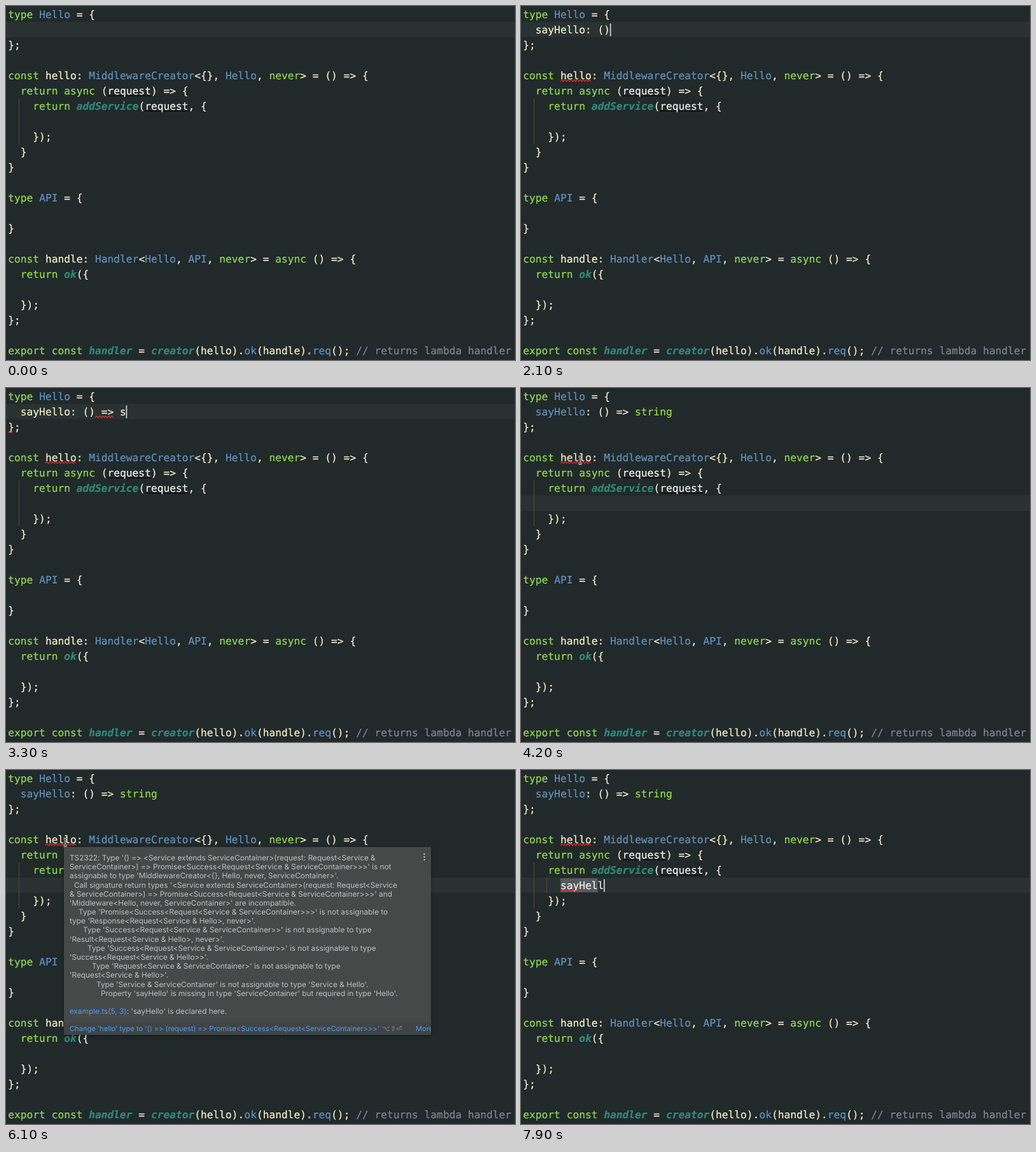
Recreate the animation shown at these times as an HTML page. Size 800 by 556 pixels, loop 8000 ms.

```html
<!DOCTYPE html>
<html lang="en">
<head>
<meta charset="utf-8">
<title>Typed middleware</title>
<style>
html, body { margin: 0; width: 100%; height: 100%; overflow: hidden; background: #22292b; }
svg { display: block; width: 800px; height: 556px; }
text { white-space: pre; text-rendering: geometricPrecision; font-variant-ligatures: none; font-feature-settings: "calt" 0; }
#code text { font: 16.23px "DejaVu Sans Mono", monospace; color: #f5f1c6; }
#code tspan { fill: currentColor; stroke: currentColor; stroke-width: .22px; }
#code .kw { color: #8fdb52; }
#code .type { color: #6093bf; }
#code .fn { color: #2f8a77; font-weight: bold; font-style: italic; }
#code .plain { color: #f3f3ec; }
#code .note { color: #7c878c; }
.under { stroke: #0b0e0f; stroke-width: 1.4; }
.wave { fill: none; stroke: #d2312d; stroke-width: 1.3; }
.guide { stroke: #6a4030; stroke-width: 1; }
#tip text { font-family: Inter, sans-serif; font-size: 11.8px; fill: #bdbfc0; }
#tip .link { fill: #4b9bf0; }
#tip .action { font-size: 11.1px; }
#tip .keys { font-family: "DejaVu Sans", sans-serif; font-size: 11px; fill: #8d9092; }
#panel { filter: drop-shadow(0 2px 3px rgba(0, 0, 0, .35)); }
#mouse path { fill: none; stroke: #fff; stroke-width: 2.4; }
#mouse path + path { stroke: #111; stroke-width: 1; }
</style>
</head>
<body>
<svg viewBox="0 0 800 556">
  <defs><clipPath id="edge"><rect x="91" y="121" width="577" height="295"/></clipPath></defs>
  <rect width="800" height="556" fill="#22292b"/>
  <rect id="band" width="800" height="24" fill="#293133"/>
  <rect id="box" height="22" fill="#555b5c"/>
  <path class="guide" d="M20.5 145V217"/>
  <path class="guide" id="inner" d="M40.5 169V193"/>
  <path class="under" d="M160 141.3H228M218 165.3H286"/>
  <g id="code"></g>
  <g id="waves"></g>
  <rect id="caret" width="1.6" height="20" fill="#dcdedc"/>
  <g id="tip">
    <rect id="panel" x="91" y="121" width="577" height="295" fill="#474949"/>
    <rect x="91" y="396" width="577" height="20" fill="#404446"/>
    <g fill="#b4b6b7">
      <circle cx="657.5" cy="132" r="1.3"/><circle cx="657.5" cy="136.5" r="1.3"/><circle cx="657.5" cy="141" r="1.3"/>
    </g>
    <g id="tipText" clip-path="url(#edge)"></g>
  </g>
  <g id="mouse"></g>
</svg>
<script>
const LOOP = 8000, CHAR = 9.772, LEFT = 3.3, ROW = 24;
const $ = id => document.getElementById(id);
const colX = col => LEFT + col * CHAR;
const baseY = row => 19 + (row - 1) * ROW;

function add(parent, tag, attrs, text) {
  const el = document.createElementNS('http://www.w3.org/2000/svg', tag);
  for (const key in attrs) el.setAttribute(key, attrs[key]);
  if (text !== undefined) el.textContent = text;
  parent.appendChild(el);
  return el;
}

// One capture group per token class, in the order of CLASSES.
const CLASSES = ['note', 'kw', 'type', 'fn', 'plain'];
const TOKENS = /(\/\/.*)|\b(type|const|return|async|export|never|string)\b|(\b(?:Hello|MiddlewareCreator|Handler|API)\b|(?<=\.)(?:ok|req)\b)|\b(addService|creator|handler|ok)\b|\b(request)\b/g;

function highlight(el, src) {
  let last = 0;
  for (const m of src.matchAll(TOKENS)) {
    add(el, 'tspan', {}, src.slice(last, m.index));
    add(el, 'tspan', { class: CLASSES[m.slice(1).findIndex(Boolean)] }, m[0]);
    last = m.index + m[0].length;
  }
  add(el, 'tspan', {}, src.slice(last));
}

const source = `type Hello = {

};

const hello: MiddlewareCreator<{}, Hello, never> = () => {
  return async (request) => {
    return addService(request, {

    });
  }
}

type API = {

}

const handle: Handler<Hello, API, never> = async () => {
  return ok({

  });
};

export const handler = creator(hello).ok(handle).req(); // returns lambda handler`;

const rows = source.split('\n').map((src, i) => {
  const el = add($('code'), 'text', { x: LEFT, y: baseY(i + 1) });
  highlight(el, src);
  return el;
});

// Each entry: indent level, text.
const message = [
  [0, "TS2322: Type '() => <Service extends ServiceContainer>(request: Request<Service &"],
  [0, "ServiceContainer>) => Promise<Success<Request<Service & ServiceContainer>>>' is not"],
  [0, "assignable to type 'MiddlewareCreator<{}, Hello, never, ServiceContainer>'."],
  [1, "Call signature return types '<Service extends ServiceContainer>(request: Request<Service"],
  [0, "& ServiceContainer>) => Promise<Success<Request<Service & ServiceContainer>>>' and"],
  [0, "'Middleware<Hello, never, ServiceContainer>' are incompatible."],
  [2, "Type 'Promise<Success<Request<Service & ServiceContainer>>>' is not assignable to"],
  [0, "type 'Response<Request<Service & Hello>, never>'."],
  [3, "Type 'Success<Request<Service & ServiceContainer>>' is not assignable to type"],
  [0, "'Result<Request<Service & Hello>, never>'."],
  [4, "Type 'Success<Request<Service & ServiceContainer>>' is not assignable to type"],
  [0, "'Success<Request<Service & Hello>>'."],
  [5, "Type 'Request<Service & ServiceContainer>' is not assignable to type"],
  [0, "'Request<Service & Hello>'."],
  [6, "Type 'Service & ServiceContainer' is not assignable to type 'Service & Hello'."],
  [7, "Property 'sayHello' is missing in type 'ServiceContainer' but required in type 'Hello'."]
];
const tipText = $('tipText');
message.forEach(([depth, s], i) => add(tipText, 'text', { x: 100 + depth * 7, y: 142 + i * 14.18 }, s));
const where = add(tipText, 'text', { x: 100, y: 383 });
add(where, 'tspan', { class: 'link' }, 'example.ts(5, 3)');
add(where, 'tspan', {}, ": 'sayHello' is declared here.");
add(tipText, 'text', { x: 100, y: 410, class: 'link action' },
  "Change 'hello' type to '() => (request) => Promise<Success<Request<ServiceContainer>>>'");
add(tipText, 'text', { x: 591, y: 410, class: 'keys' }, '⌥⇧⏎');
add(tipText, 'text', { x: 644, y: 410, class: 'link action' }, 'More actions...');

// Text cursor: a pale outline under a dark core.
for (let i = 0; i < 2; i++) {
  add($('mouse'), 'path', { d: 'M90.5 107.5Q93 107.5 93 109.5V117.5Q93 119.5 90.5 119.5M95.5 107.5Q93 107.5 93 109.5M93 117.5Q93 119.5 95.5 119.5' });
}

function wave(row, from, to) {
  const end = colX(to);
  let x = colX(from), d = `M${x} ${baseY(row) + 3.6}`;
  for (let up = true; x + 2.4 <= end; up = !up) {
    x += 2.4;
    d += `L${x} ${baseY(row) + (up ? 0.8 : 3.6)}`;
  }
  return add($('waves'), 'path', { class: 'wave', d });
}

const show = (el, on) => { el.style.display = on ? '' : 'none'; };

// Key times for each character of the two typed lines.
const FIRST = 'sayHello: () => string', SECOND = 'sayHell';
const firstKeys = [750, 850, 950, 1050, 1150, 1220, 1300, 1500, 1700, 1900, 2050, 2100,
  2250, 2400, 2500, 2700, 3000, 3400, 3480, 3560, 3640, 3700];
const secondKeys = [7250, 7350, 7450, 7580, 7700, 7800, 7880];
const typed = (keys, t) => keys.filter(k => k <= t).length;

function stateAt(t) {
  const a = typed(firstKeys, t), b = typed(secondKeys, t);
  const done = t >= 3800, naming = a < 9;
  return {
    a, b, done, naming,
    row: done ? 8 : 2,
    col: done ? 6 + b : 2 + a,
    blue: done ? 8 : naming ? Math.max(0, a - 3) : 0,
    boxed: done ? Math.max(0, b - 1) : naming ? a : 0,
    caret: done ? t >= 6300 && !(t >= 6900 && t < 7200) : t >= 500,
    helloBad: t >= 1000,
    arrowBad: t >= 2600 && !done,
    mouse: t >= 4000 && t < 6300,
    tip: t >= 4300 && t < 6300
  };
}

let shown = '';
function render(t) {
  const s = stateAt(t), key = JSON.stringify(s);
  if (key === shown) return;
  shown = key;

  const text = FIRST.slice(0, s.a);
  rows[1].textContent = '  ';
  add(rows[1], 'tspan', { class: 'type' }, text.slice(0, s.blue));
  if (s.naming) add(rows[1], 'tspan', { class: 'plain' }, text.slice(s.blue));
  else highlight(rows[1], text.slice(s.blue));
  rows[7].textContent = '      ';
  add(rows[7], 'tspan', { class: 'plain' }, SECOND.slice(0, s.b));

  $('waves').textContent = '';
  if (s.helloBad) wave(5, 6, 11);
  if (s.naming && s.blue) wave(2, 2, 2 + s.blue);
  if (s.arrowBad) { wave(2, 14, 17); wave(3, 0, 0.8); }
  if (s.b > 4) wave(8, 6, 2 + s.b);

  const top = baseY(s.row) - 18;
  $('band').setAttribute('y', top);
  $('box').setAttribute('x', colX(s.done ? 6 : 2));
  $('box').setAttribute('y', top + 1);
  $('box').setAttribute('width', s.boxed * CHAR);
  $('caret').setAttribute('x', colX(s.col) - 0.3);
  $('caret').setAttribute('y', top + 2.5);
  show($('caret'), s.caret);
  show($('inner'), s.b > 0);
  show($('mouse'), s.mouse);
  show($('tip'), s.tip);
}

function tick() {
  render(performance.now() % LOOP);
  requestAnimationFrame(tick);
}
tick();
</script>
</body>
</html>
```
